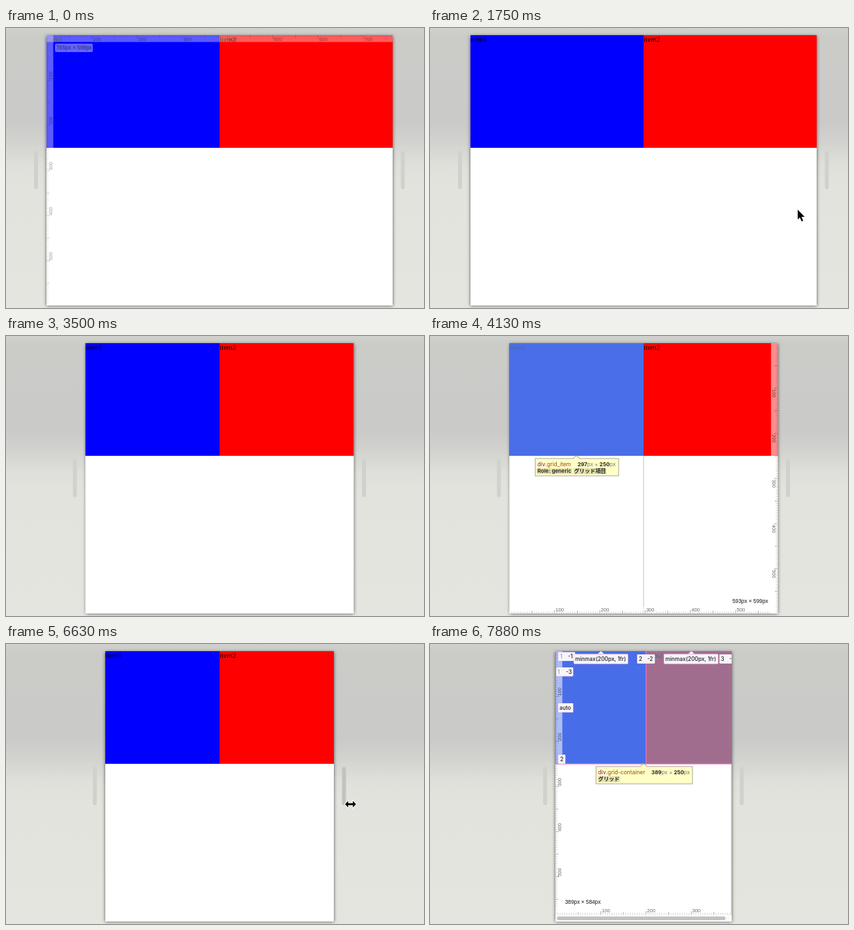
Recreate the animation shown at these times as an HTML page with a canvas. Size 640x430 px, loop 8000 ms.

```html
<!DOCTYPE html>
<html lang="ja">
<head>
<meta charset="utf-8">
<title>Grid resize</title>
<style>
html, body { margin: 0; width: 100%; height: 100%; overflow: hidden; background: #e3e4dd; }
canvas { display: block; }
</style>
</head>
<body>
<canvas id="stage" width="640" height="430"></canvas>
<script>
const ctx = document.getElementById('stage').getContext('2d');
const LOOP = 8000, STEP = 125;
const SCALE = 0.693, MID = 327, TOP = 11, PAGE_H = 415.3, ITEM_H = 173, COL_MIN = 200 * SCALE;
const SANS = '"Liberation Sans", Arial, sans-serif';
const UI = 'Inter, "Noto Sans CJK JP", "Noto Sans CJK", sans-serif';
const SERIF = '"Liberation Serif", "Times New Roman", serif';

// Each run is [start, values]; values change every STEP and the last one stays.
const halfWidth = [[0, [265]],
  [2380, [262, 256, 246, 233, 220, 210, 205.5]],
  [6250, [201, 194, 186, 175, 163, 153, 146]],
  [7130, [141, 137, 134.8]]];
const DRAG = 1;
const pointer = [[0, [0]],
  [1250, [0, 0, [604, 262], [585, 272], [563, 279], [592, 256], DRAG]],
  [3250, [0]],
  [5380, [0, 0, [592, 241], [583, 243], [570, 245], DRAG]],
  [7130, [DRAG, DRAG, DRAG, 0]]];
const overlay = [[0, [0.65]],
  [130, [0.35, 0, 0.5, 0.8, 1]],
  [1250, [0.5, 0]],
  [3250, [0, 0, 0, 0, 0.5, 0.8, 0.95]],
  [4130, [1]],
  [5380, [0.5, 0]],
  [7130, [0, 0, 0, 0, 0.5, 0.85, 1]]];

function at(runs, t) {
  const [start, values] = runs.filter(r => t >= r[0]).pop();
  return values[Math.min(Math.floor((t - start) / STEP), values.length - 1)];
}

function rect(x, y, w, h, color, radius = 0) {
  ctx.fillStyle = color;
  ctx.beginPath();
  ctx.roundRect(x, y, w, h, radius);
  ctx.fill();
}

function line(x1, y1, x2, y2, color, width = 1) {
  ctx.strokeStyle = color;
  ctx.lineWidth = width;
  ctx.beginPath();
  ctx.moveTo(x1, y1);
  ctx.lineTo(x2, y2);
  ctx.stroke();
}

// Returns the x where the text ends.
function text(str, x, y, font, color) {
  ctx.font = font;
  ctx.fillStyle = color;
  ctx.fillText(str, x, y);
  return x + ctx.measureText(str).width;
}

function polygon(points, fill, stroke, width) {
  ctx.beginPath();
  points.forEach(([x, y]) => ctx.lineTo(x, y));
  ctx.closePath();
  if (stroke) {
    ctx.strokeStyle = stroke;
    ctx.lineWidth = width;
    ctx.stroke();
  }
  ctx.fillStyle = fill;
  ctx.fill();
}

function backdrop() {
  const g = ctx.createLinearGradient(0, 0, 0, 430);
  [[0, '#d0d1cd'], [0.03, '#cbccc8'], [0.34, '#cacac8'], [0.41, '#d2d2cf'],
   [0.49, '#dfe0da'], [0.56, '#e2e3dc'], [1, '#e4e5de']].forEach(s => g.addColorStop(...s));
  ctx.fillStyle = g;
  ctx.fillRect(0, 0, 640, 430);
}

function page(p) {
  ctx.save();
  ctx.shadowColor = 'rgba(0,0,0,.65)';
  ctx.shadowBlur = 5;
  ctx.shadowOffsetY = 0.5;
  rect(p.left, TOP, p.width, PAGE_H, '#fff');
  ctx.restore();
  rect(p.left, TOP, p.split - p.left, ITEM_H, '#00f');
  rect(p.split, TOP, p.right - p.split, ITEM_H, '#f00');
  text('item1', p.left, 21, `11.1px ${SERIF}`, '#000');
  text('item2', p.split, 21, `11.1px ${SERIF}`, '#000');
  if (p.scrolls) {
    rect(p.left, p.bottom, p.width, 10.4, '#fafafa');
    rect(p.left + 2, 418.5, p.width * p.width / (2 * COL_MIN) - 4, 5.5, '#c1c1c1', 3);
  }
}

// Draws marks along +x from the origin, growing towards `side` (1 down, -1 up).
function marks(length, side) {
  for (let px = 5; px * SCALE < length; px += 5) {
    const x = px * SCALE, big = px % 50 === 0;
    line(x, 0, x, side * (px % 100 === 0 ? 5.5 : big ? 4.5 : 3), `rgba(0,0,0,${big ? 0.5 : 0.27})`, 0.7);
  }
}

function ruler(x, y, length, angle, side, labelAngle) {
  ctx.save();
  ctx.translate(x, y);
  ctx.rotate(angle);
  rect(0, side > 0 ? 0 : -10.4, length, 10.4, 'rgba(255,255,255,.55)');
  marks(length, side);
  for (let px = 100; px * SCALE < length - 8; px += 100) {
    ctx.save();
    ctx.translate(px * SCALE, 0);
    if (labelAngle) ctx.scale(1, -1);
    text(px, 1.5, labelAngle ? 0 : side > 0 ? 9.3 : -3.5, `7.6px ${SANS}`, 'rgba(0,0,0,.6)');
    ctx.restore();
  }
  ctx.restore();
}

function sideRuler(x, dir, height) {
  rect(dir > 0 ? x : x - 10.4, TOP, 10.4, height, 'rgba(255,255,255,.55)');
  for (let px = 5; px * SCALE < height; px += 5) {
    const y = TOP + px * SCALE, big = px % 50 === 0;
    line(x, y, x + dir * (px % 100 === 0 ? 5.5 : big ? 4.5 : 3), y, `rgba(0,0,0,${big ? 0.5 : 0.27})`, 0.7);
    if (px % 100) continue;
    ctx.save();
    ctx.translate(x + dir * 9, y);
    ctx.rotate(-dir * Math.PI / 2);
    text(px, dir > 0 ? 0.5 : 1.5, dir > 0 ? 0 : -0.5, `7.6px ${SANS}`, 'rgba(0,0,0,.6)');
    ctx.restore();
  }
}

function pageSize(p, x, y) {
  text(`${Math.round(p.width / SCALE)}px × ${p.scrolls ? 584 : 599}px`, x, y, `8.3px ${SANS}`, '#111');
}

function tooltip(center, width, cls, size, notes) {
  const x = Math.round(center - width / 2) + 0.5, r = x + width, y = 188.5, b = 214.5;
  polygon([[x, y], [center - 5, y], [center, 184], [center + 5, y], [r, y], [r, b], [x, b]],
    '#ffffc6', '#8c8c80', 1.6);
  const end = text('div', x + 3, 200, `8.5px ${UI}`, '#881280');
  text(cls, end, 200, `8.5px ${UI}`, '#994d14');
  let w = r - 62.5;
  [size, 'px', ' × ', 250, 'px'].forEach(part => {
    const bold = typeof part === 'number';
    w = text(part, w, 200, `${bold ? 'bold ' : ''}8px ${UI}`, bold ? '#222' : '#777');
  });
  let n = x + 3;
  notes.forEach(note => {
    ctx.font = `600 8.2px ${UI}`;
    rect(n - 0.5, 203, ctx.measureText(note).width + 1, 9, '#e2dfae');
    n = text(note, n, 210.3, ctx.font, '#222') + 4;
  });
}

function itemOverlay(p) {
  rect(p.left, TOP, p.split - p.left, ITEM_H, 'rgba(111,168,220,.66)');
  line(p.split, TOP + ITEM_H, p.split, p.bottom, 'rgba(128,60,110,.55)', 0.7);
  sideRuler(p.right, -1, PAGE_H);
  ruler(p.left, p.bottom, p.width - 10.4, 0, -1);
  pageSize(p, p.right - 69.5, 409.7);
  tooltip((p.left + p.split) / 2, 127, '.grid_item', Math.round(Math.round(p.width / SCALE) / 2),
    ['Role: generic', 'グリッド項目']);
}

function tag(x, y, w, h, parts, arrow) {
  ctx.save();
  ctx.shadowColor = '#e070c0';
  ctx.shadowBlur = 1.5;
  rect(x, y, w, h, '#f6f4fc', 1);
  if (arrow) polygon([[arrow - 5, y], [arrow, y - 4.5], [arrow + 5, y]], '#f6f4fc');
  ctx.restore();
  parts.forEach(([str, dx, color = '#222']) =>
    text(str, x + dx, y + h / 2 + 3, `500 8.4px ${UI}`, color));
}

function gridOverlay(p) {
  const pink = '#e56cc0', end = TOP + ITEM_H, l = p.left;
  rect(l, TOP, p.width, ITEM_H, 'rgba(111,168,220,.65)');
  sideRuler(l, 1, p.bottom - TOP);
  ruler(l, p.bottom, p.width, 0, -1);
  pageSize(p, l + 14.5, 399);
  line(l, end, p.right, end, pink, 1.5);
  line(p.split, TOP, p.split, end, pink, 1.5);
  line(p.right - 0.5, TOP, p.right - 0.5, p.bottom, 'rgba(200,90,160,.55)', 0.8);
  const grey = '#999';
  tag(l + 4, 12.5, 26, 13.5, [['1', 3, grey], ['-1', 15]]);
  tag(l + 1, 36, 26, 13.5, [['1', 2, grey], ['-3', 15]]);
  tag(l + 4, 91, 23, 14, [['auto', 2]]);
  tag(l + 4, 170, 11, 14, [['2', 3]]);
  tag(l + 28, 15.5, 83, 15, [['minmax(200px, 1fr)', 2]], l + 69.5);
  tag(l + 166, 15.5, 83, 15, [['minmax(200px, 1fr)', 2]], l + 208);
  tag(l + 125, 16, 27, 14, [['2', 2.5], ['-2', 15.5]]);
  tag(l + 251, 16, 27, 14, [['3', 2], ['-3', 15]]);
  tooltip(MID, 147, '.grid-container', 389, ['グリッド']);
}

function rulerOverlay(p) {
  ruler(p.left, TOP, p.width, 0, 1);
  sideRuler(p.left, 1, PAGE_H);
  rect(p.left + 13, 24, 58, 13, 'rgba(255,255,255,.6)', 2.5);
  pageSize(p, p.left + 15, 33.3);
}

function arrowCursor(x, y) {
  const shape = [[0, 0], [0, 15], [3.3, 12], [6, 18], [8.4, 17], [5.8, 11], [10.6, 11]];
  polygon(shape.map(([a, b]) => [x + a, y + b]), '#000', '#fff', 2);
}

function resizeCursor(x, y) {
  const half = [[-8.5, 0], [-3.5, -5], [-3.5, -1.4], [3.5, -1.4], [3.5, -5], [8.5, 0]];
  const shape = [...half, [3.5, 5], [3.5, 1.4], [-3.5, 1.4], [-3.5, 5]];
  polygon(shape.map(([a, b]) => [x + a, y + b]), '#000', '#fff', 2);
}

function draw(t) {
  const half = at(halfWidth, t), cursor = at(pointer, t), alpha = at(overlay, t);
  const scrolls = half < COL_MIN;
  const p = {
    left: MID - half, right: MID + half, width: half * 2, scrolls,
    split: MID - half + Math.max(half, COL_MIN),
    bottom: TOP + PAGE_H - (scrolls ? 10.4 : 0)
  };
  backdrop();
  rect(p.left - 19, 189, 6, 58.5, '#d0d1cc', 3);
  rect(p.right + 12.5, 189, 6, 58.5, cursor === DRAG ? '#c2c3be' : '#d0d1cc', 3);
  page(p);
  if (alpha) {
    ctx.save();
    ctx.beginPath();
    ctx.rect(p.left, TOP, p.width, PAGE_H);
    ctx.clip();
    ctx.globalAlpha = alpha;
    (t < 380 ? rulerOverlay : t < 7000 ? itemOverlay : gridOverlay)(p);
    ctx.restore();
  }
  if (cursor === DRAG) resizeCursor(p.right + 25.5, 246);
  else if (cursor) arrowCursor(...cursor);
}

const begin = performance.now();
function frame() {
  draw((performance.now() - begin) % LOOP);
  requestAnimationFrame(frame);
}
frame();
</script>
</body>
</html>
```
